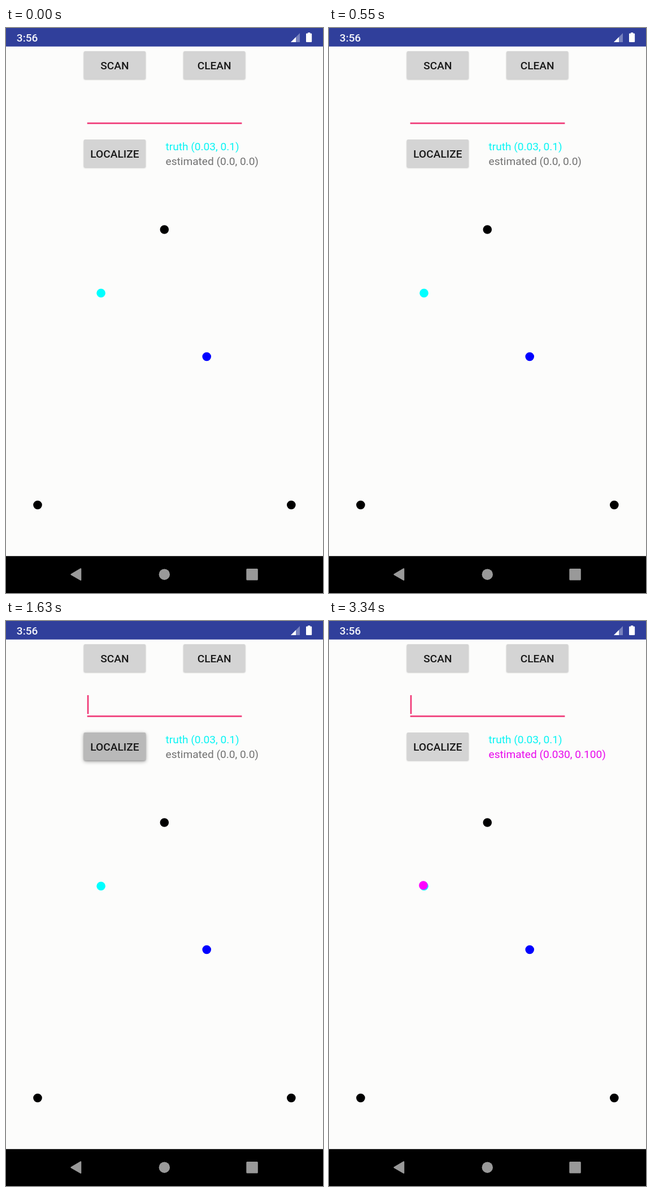
Recreate the animation shown at these times as an HTML page. Size 561 px wide and 998 px high, loop 3380 ms.

```html
<!DOCTYPE html>
<html lang="en">
<head>
<meta charset="utf-8">
<title>Localization demo</title>
<style>
  html, body { margin: 0; width: 100%; height: 100%; overflow: hidden; background: #fcfcfb; }
  svg { display: block; width: 100%; height: 100%; }
  text { font: 19.09px Roboto, sans-serif; }
  .label, .clock { font-weight: 500; }
  .label { fill: #181818; text-anchor: middle; }
  .clock { fill: #f4f5fa; }
  .button { fill: #d4d4d4; filter: drop-shadow(0 1.3px 1.3px rgba(0, 0, 0, .24)); }
  .pressed { fill: #b9b9b9; filter: drop-shadow(0 2.5px 3.5px rgba(0, 0, 0, .34)); }
  .pink { fill: #f03a78; }
  .truth { fill: #00ffff; }
  .idle { fill: #717171; }
  .found { fill: #ff00ff; }
  text.truth { fill: #08f4f4; }
  text.found { fill: #e808ec; }

  .cursor, .pressed, .idle, .result { animation: 3.38s infinite; }
  .cursor { animation-name: blink; animation-timing-function: step-end; }
  .idle { animation-name: hide; animation-timing-function: step-end; }
  .result { animation-name: show; animation-timing-function: step-end; }
  .pressed { animation-name: press; animation-timing-function: ease-out; }

  @keyframes blink {
    0% { opacity: 0; }
    26.63% { opacity: 1; }
    55.62% { opacity: 0; }
    98.82%, 100% { opacity: 1; }
  }
  @keyframes hide {
    0% { opacity: 1; }
    56.8%, 100% { opacity: 0; }
  }
  @keyframes show {
    0% { opacity: 0; }
    56.8%, 100% { opacity: 1; }
  }
  @keyframes press {
    0%, 39.6% { opacity: 0; }
    47.3%, 55.62% { opacity: 1; }
    70.4%, 100% { opacity: 0; }
  }
</style>
</head>
<body>
<svg viewBox="0 0 561 998" preserveAspectRatio="none">
  <defs>
    <rect id="btn" width="109.4" height="49.2" rx="2.5"/>
    <circle id="dot" r="7.8"/>
  </defs>

  <!-- status bar -->
  <rect width="561" height="32.7" fill="#303f9b"/>
  <text class="clock" x="18.8" y="24">3:56</text>
  <path d="M504 25H520V9Z" fill="#fff" opacity=".35"/>
  <path d="M504 25H513V16Z" fill="#fff"/>
  <path d="M532 9.5H534.2V8H538.2V9.5H540Q541.2 9.5 541.2 10.7V23.8Q541.2 25 540 25H532.2Q531 25 531 23.8V10.7Q531 9.5 532 9.5Z" fill="#fff"/>

  <!-- controls -->
  <use href="#btn" class="button" x="137.7" y="41"/>
  <use href="#btn" class="button" x="314" y="41"/>
  <use href="#btn" class="button" x="137.7" y="197"/>
  <use href="#btn" class="pressed" x="137.7" y="197"/>
  <text class="label" x="192.4" y="73">SCAN</text>
  <text class="label" x="368.7" y="73">CLEAN</text>
  <text class="label" x="192.4" y="229">LOCALIZE</text>
  <rect class="pink" x="143.7" y="166.9" width="273.7" height="2.7"/>
  <rect class="pink cursor" x="143.7" y="131" width="2.7" height="33.3"/>

  <text class="truth" x="282.6" y="216">truth (0.03, 0.1)</text>
  <text class="idle" x="282.6" y="242">estimated (0.0, 0.0)</text>
  <text class="found result" x="282.6" y="242">estimated (0.030, 0.100)</text>

  <!-- map -->
  <use href="#dot" x="280.3" y="356"/>
  <use href="#dot" x="56" y="842.5"/>
  <use href="#dot" x="504.8" y="842.5"/>
  <use href="#dot" class="truth" x="168.1" y="468.2"/>
  <use href="#dot" x="355.2" y="580.5" fill="#00f"/>
  <use href="#dot" class="found result" x="167" y="467"/>

  <!-- navigation bar -->
  <rect y="932.8" width="561" height="65.2"/>
  <g fill="#999">
    <path d="M115 964.2L131.5 954.4Q133.3 953.6 133.3 955.5V974.8Q133.3 976.7 131.5 975.8L115 966.2Q113.3 965.2 115 964.2Z"/>
    <circle cx="280.3" cy="965.2" r="9.7"/>
    <rect x="425.3" y="955" width="20.5" height="20.5" rx="1.5"/>
  </g>
</svg>
</body>
</html>
```
